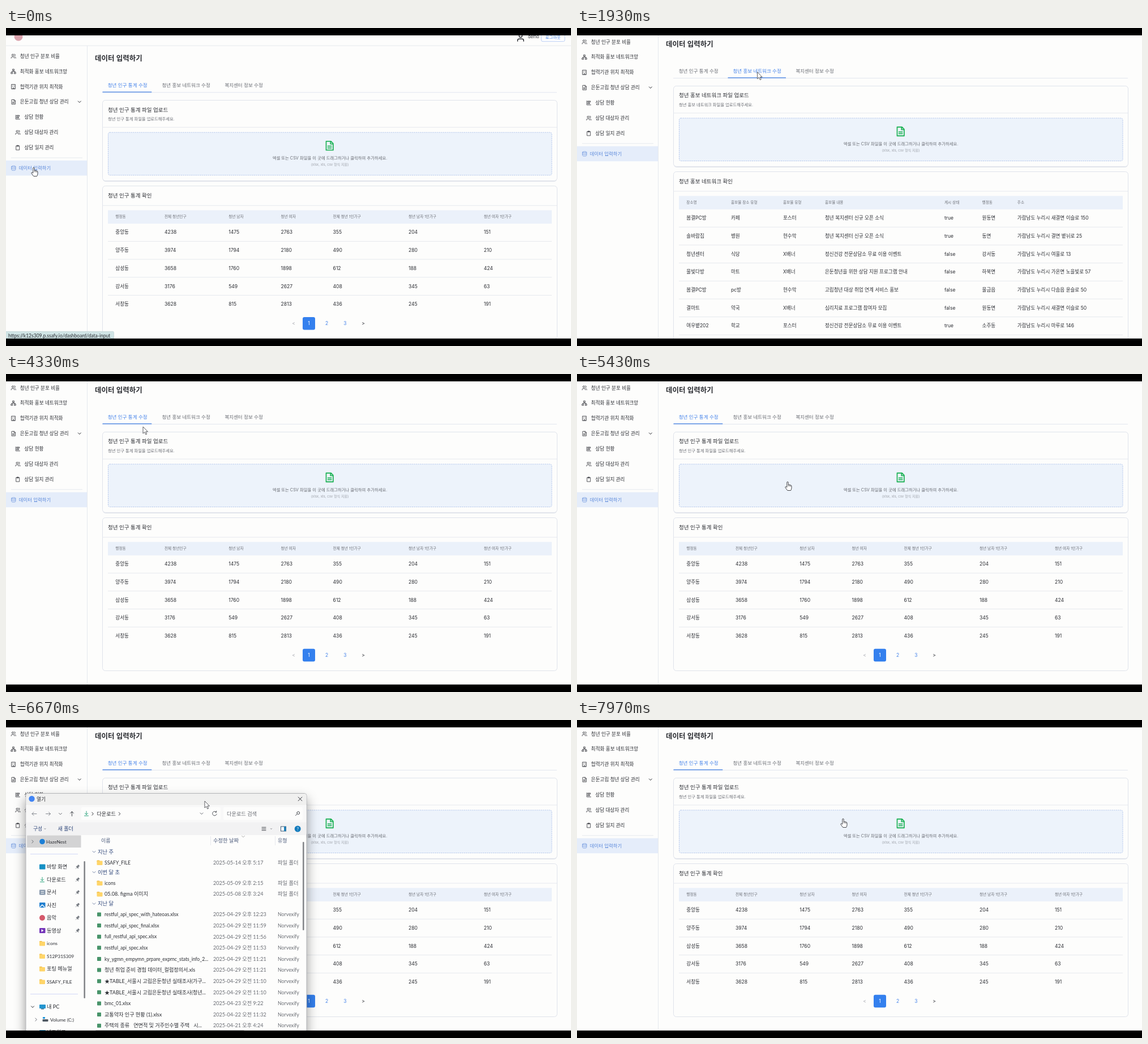
An HTML page for the animation above (8000 ms loop, 998 px wide and 561 px high).

```html
<!DOCTYPE html>
<html lang="ko">
<head>
<meta charset="utf-8">
<style>
  html, body { margin: 0; width: 100%; height: 100%; overflow: hidden; background: #fdfdfc; }
  svg { display: block; width: 998px; height: 561px; }
  text { font-family: Inter, 'Noto Sans CJK KR', 'Noto Sans CJK', sans-serif; white-space: pre; }
  #dialog text { font-family: Lato, 'Noto Sans CJK KR', 'Noto Sans CJK', sans-serif; }
  #status text { font-family: Lato, sans-serif; }
  #frame { filter: drop-shadow(0 10px 10px rgba(0, 0, 0, .4)); }
</style>
</head>
<body>
<svg id="stage" viewBox="0 0 998 561"></svg>
<script>
const LOOP = 8000;
const BLUE = '#4583ea', INK = '#2b2d33', GRAY = '#6a6d74', LINE = '#e6e9ee', PAPER = '#fdfdfc';

// Drawing helpers; text y is the visual middle of the line.
const text = (x, y, s, size = 8.55, fill = INK, extra = '') =>
  `<text x="${x}" y="${y + size * .36}" font-size="${size}" fill="${fill}" ${extra}>${s}</text>`;
const mid = (x, y, s, size, fill, extra = '') => text(x, y, s, size, fill, 'text-anchor="middle" ' + extra);
const rect = (x, y, w, h, fill, extra = '') =>
  `<rect x="${x}" y="${y}" width="${w}" height="${h}" fill="${fill}" ${extra}/>`;
const line = (x1, y1, x2, y2, color = LINE, w = 1) =>
  `<path d="M${x1} ${y1}L${x2} ${y2}" stroke="${color}" stroke-width="${w}"/>`;
const stroke = (x, y, d, color, w = 1) =>
  `<path transform="translate(${x} ${y})" d="${d}" fill="none" stroke="${color}" stroke-width="${w}" stroke-linecap="round" stroke-linejoin="round"/>`;
const dot = (x, y, r, fill) => `<circle cx="${x}" cy="${y}" r="${r}" fill="${fill}"/>`;
const icon = (x, y, size, name, color = INK, w = 2) =>
  `<g transform="translate(${x} ${y}) scale(${size / 24}) translate(-12 -12)">${stroke(0, 0, ICONS[name], color, w)}</g>`;

const ICONS = {
  users: 'M16 21v-2a4 4 0 0 0-4-4H6a4 4 0 0 0-4 4v2M5 7a4 4 0 1 0 8 0a4 4 0 1 0-8 0M22 21v-2a4 4 0 0 0-3-4M16 3a4 4 0 0 1 0 8',
  user: 'M20 21v-2a4 4 0 0 0-4-4H8a4 4 0 0 0-4 4v2M8 7a4 4 0 1 0 8 0a4 4 0 1 0-8 0',
  network: 'M16 16h6v6h-6zM2 16h6v6H2zM9 2h6v6H9zM5 16v-4h14v4M12 12V8',
  building: 'M4 2h16v20H4zM9 22v-4h6v4M8 7h1M15 7h1M8 12h1M15 12h1',
  file: 'M15 2H4v20h16V7zM14 2v6h6M8 13h8M8 17h8',
  chart: 'M3 3v18h18M8 4h11v4H8zM8 12h8v4H8z',
  clipboard: 'M5 4h14v18H5zM9 2h6v4H9z',
  data: 'M3 5a9 3 0 1 0 18 0a9 3 0 1 0-18 0M3 5v14a9 3 0 0 0 18 0V5M3 12a9 3 0 0 0 18 0'
};
const DOWN = 'M-2.5 -1.2L0 1.3L2.5 -1.2', RIGHT = 'M-1.2 -2.5L1.3 0L-1.2 2.5';

function sidebar() {
  const items = [['users', '청년 인구 분포 비율'], ['network', '최적화 홍보 네트워크망'], ['building', '협력기관 위치 최적화'],
    ['file', '은둔고립 청년 상담 관리'], ['chart', '상담 현황'], ['users', '상담 대상자 관리'], ['clipboard', '상담 일지 관리']];
  return line(143.5, 6, 143.5, 600) +
    items.map(([name, label], i) => {
      const inset = i > 3 ? 7.7 : 0, y = 24.5 + i * 26.9;
      return icon(13.2 + inset, y, 9.6, name) + text(24.8 + inset, y, label);
    }).join('') +
    stroke(129.8, 105, DOWN, INK) + line(9, 203.8, 135, 203.8) +
    rect(0, 208.5, 143, 26.7, '#e5edfa') + icon(13.3, 222, 9.6, 'data', '#6a93dd') +
    text(22.8, 222, '데이터 입력하기', 8.4, '#5a88da');
}

function header() {
  return dot(22, -10, 7.5, '#dba3ad') + icon(909, -8, 16, 'user', INK, 2.2) + text(922, -9.5, 'demo', 7.4) +
    rect(945.5, -17, 41.5, 15.5, '#fff', 'rx="2.5" stroke="#b9cdf5"') +
    mid(966.3, -9.3, '로그아웃', 7.3, BLUE) + line(0, 6, 998, 6);
}

function table(xs, heads, rows, pager) {
  const row = (cells, i) => {
    const y = 335.2 + i * 31.7;
    return cells.map((c, k) => text(xs[k], y, c)).join('') +
      (pager && i === rows.length - 1 ? '' : line(180, y + 16, 964, y + 16));
  };
  return rect(180, 296.3, 784, 23.7, '#ebf1fa') +
    heads.map((h, k) => text(xs[k], 307.6, h, 6.65, GRAY)).join('') +
    rows.map(row).join('') +
    (pager ? mid(508, 496, '&lt;', 8.5, '#a5a8ae') + rect(524, 484.8, 22, 22.4, '#3480ee', 'rx="3"') +
      mid(535, 496, '1', 8.5, '#fff') + mid(566.5, 496, '2', 8.5, BLUE) + mid(599, 496, '3', 8.5, BLUE) +
      mid(631, 496, '&gt;', 8.5, INK) : '');
}

const card = (y, h) => rect(170.5, y, 803, h, PAPER, 'rx="5" stroke="#dfe3eb"');

const TABS = [
  { x: 179.8, from: 170.5, to: 257.3, label: '청년 인구 통계 수정', topic: '청년 인구 통계', pager: true,
    xs: [193.3, 280, 393.2, 485.5, 577.6, 711, 844],
    heads: ['행정동', '전체 청년인구', '청년 남자', '청년 여자', '전체 청년 1인가구', '청년 남자 1인가구', '청년 여자 1인가구'],
    rows: ['중앙동 4238 1475 2763 355 204 151', '양주동 3974 1794 2180 490 280 210', '삼성동 3658 1760 1898 612 188 424',
      '강서동 3176 549 2627 408 345 63', '서창동 3628 815 2813 436 245 191'].map(r => r.split(' ')) },
  { x: 275.4, from: 266.5, to: 369, label: '청년 홍보 네트워크 수정', topic: '청년 홍보 네트워크',
    xs: [193.3, 272, 364, 438, 649, 715.6, 777.8],
    heads: ['장소명', '홍보물 장소 유형', '홍보물 유형', '홍보물 내용', '게시 상태', '행정동', '주소'],
    rows: ['봄결PC방|카페|포스터|청년 복지센터 신규 오픈 소식|true|원동면|새결면 이슬로 150',
      '솔바람집|병원|현수막|청년 복지센터 신규 오픈 소식|true|동면|결면 볕뉘로 25',
      '청년센터|식당|X배너|정신건강 전문상담소 무료 이용 이벤트|false|강서동|여울로 13',
      '물빛다방|마트|X배너|은둔청년을 위한 상담 지원 프로그램 안내|false|하북면|가온면 노을빛로 57',
      '봄결PC방|pc방|현수막|고립청년 대상 취업 연계 서비스 홍보|false|물금읍|다솜읍 윤슬로 50',
      '결마트|약국|X배너|심리치료 프로그램 참여자 모집|false|원동면|새결면 이슬로 50',
      '여우볕202|학교|포스터|정신건강 전문상담소 무료 이용 이벤트|true|소주동|마루로 146']
      .map(r => r.split('|')).map(r => [...r.slice(0, 6), '가람남도 누리시 ' + r[6]]) },
  { x: 386.4, from: 377.5, to: 462.5, label: '복지센터 정보 수정', topic: '복지센터 정보', pager: true,
    xs: [193.3, 438, 715.6], heads: ['센터명', '센터 유형', '행정동'],
    rows: ['중앙동', '양주동', '삼성동', '강서동', '서창동'].map(d => ['청년센터', '복지센터', d]) }
];

function tabView(tab, i) {
  return `<g class="tab">` + line(170, 88.5, 973, 88.5, '#e3e7f0') +
    TABS.map(t => text(t.x, 76, t.label, 8.5, t === tab ? BLUE : GRAY)).join('') +
    rect(tab.from, 87, tab.to - tab.from, 1.6, '#6697e6') +
    text(180, 119, tab.topic + ' 파일 업로드', 9.5, INK, 'font-weight="500"') +
    text(180, 135, tab.topic + ' 파일을 업로드해주세요.', 7.3, GRAY) +
    card(253.5, tab.pager ? 270 : 340) + line(170.5, 288, 973, 288) +
    text(180, 270.3, tab.topic + ' 확인', 9.5, INK, 'font-weight="500"') +
    table(tab.xs, tab.heads, tab.rows, tab.pager) + `</g>`;
}

function page() {
  return header() + sidebar() + text(157, 28.6, '데이터 입력하기', 12.5, '#2a2c31', 'font-weight="600"') +
    rect(171, 105, 802, 141, '#e3e6ec', 'rx="5"') + card(102.3, 142) + line(170.5, 150, 973, 150) +
    rect(180.5, 159, 783.5, 75.5, '#edf3fb', 'rx="3" stroke="#afc3ea" stroke-dasharray="2 1.4"') +
    icon(571.7, 182.5, 18.6, 'file', '#25b45c', 2.3) +
    mid(572, 204, '엑셀 또는 CSV 파일을 이 곳에 드래그하거나 클릭하여 추가하세요.', 7.35, GRAY) +
    mid(572, 216, '(xlsx, xls, csv 형식 지원)', 6.1, '#9da1a9') + TABS.map(tabView).join('');
}

const folder = (x, y) => rect(x - 5, y - 4, 5, 3, '#eab540', 'rx="1"') + rect(x - 5, y - 3, 10, 7.4, '#ffd569', 'rx="1"');

function places() {
  const pinned = [['바탕 화면', '#1690c4'], ['다운로드', ''], ['문서', '#8798ac'], ['사진', '#2380cf'], ['음악', '#d5596b'], ['동영상', '#7434b8']];
  const folders = ['icons', 'S12P31S309', '포팅 메뉴얼', 'SSAFY_FILE'];
  const screen = y => rect(59, y - 4, 11, 7, '#2495cf', 'rx="1"') + rect(62, y + 3, 5, 1.5, '#55798f');
  const get = (x, y) => stroke(x, y, 'M0 -4V2M-2.5 -.5L0 2L2.5 -.5M-3.5 4.2H3.5', '#26a27b');
  const name = (x, y, s) => text(x, y, s, /[가-힣]/.exec(s) ? 9.2 : 8.4);
  return rect(37, 203.5, 95.5, 21.5, '#d3d3d4') + stroke(47, 214.5, RIGHT, GRAY) + dot(64, 214.5, 4.8, '#1c7fd6') +
    name(71, 214.7, 'HazeNest') + line(43, 236.5, 127, 236.5, '#d2d8f8') +
    pinned.map(([label, color], i) => {
      const y = 259 + i * 22.5;
      return (color ? (i === 4 ? dot(64, y, 5, color) : rect(59, y - 4.5, 10.5, 9, color, 'rx="1"')) : get(64, y)) +
        (i === 2 ? line(61.5, y - 1.5, 67, y - 1.5, '#fff') + line(61.5, y + 1.5, 67, y + 1.5, '#fff') : '') +
        (i === 3 ? stroke(64, y, 'M-4 3.5L0 -.5L4 3.5', '#fff', 1.4) : '') +
        (i === 5 ? `<path d="M62.5 ${y - 2.5}l4 2.5l-4 2.5z" fill="#fff"/>` : '') +
        name(72, y, label) +
        `<path transform="translate(126.5 ${y})" d="M-3.5 3.5L-1 1M-2.5 -.5L1 3L1 .5L3.3 -1.5L1.2 -3.5L-.5 -1.2z" fill="#777b82" stroke="#777b82" stroke-width=".8"/>`;
    }).join('') +
    folders.map((s, i) => folder(64, 394 + i * 22.5) + name(72, 394 + i * 22.5, s)).join('') +
    line(43, 483.5, 127, 483.5, '#d2d8f8') + stroke(47, 506, DOWN, INK) + screen(506) + name(72, 506, '내 PC') +
    stroke(53, 528.5, RIGHT, GRAY) + rect(64.5, 528, 10, 4, '#505962', 'rx="1"') + rect(65, 524, 4, 3, '#2398dc') +
    name(78, 529, 'Volume (C:)') + stroke(47, 551, RIGHT, GRAY) + screen(551) + name(72, 551, '네트워크') +
    rect(137.4, 249, 2.6, 242, '#85878b', 'rx="1.3"');
}

function files() {
  const group = (y, s) => stroke(155.5, y, DOWN, '#536793', .8) + text(162, y, s, 9.3, '#2c4478');
  const row = (y, s, date, isFolder) => (isFolder ? folder(165.5, y) : rect(161, y - 3.5, 7, 7, '#48946a', 'rx=".8"')) +
    text(174, y, s, /[가-힣]/.exec(s) ? 9.1 : 8.6) + text(366, y, '2025-' + date, 9.1, GRAY) +
    text(480, y, isFolder ? '파일 폴더' : 'Norvexify E', isFolder ? 9.3 : 8.8, GRAY);
  const sheets = [['restful_api_spec_with_hateoas.xlsx', '04-29 오후 12:23'], ['restful_api_spec_final.xlsx', '04-29 오전 11:59'],
    ['full_restful_api_spec.xlsx', '04-29 오전 11:56'], ['restful_api_spec.xlsx', '04-29 오전 11:53'],
    ['ky_ygmn_empymn_prpare_exprnc_stats_info_2...', '04-29 오전 11:21'], ['청년 취업 준비 경험 데이터_컬럼정의서.xls', '04-29 오전 11:21'],
    ['★TABLE_서울시 고립은둔청년 실태조사(가구...', '04-29 오전 11:10'], ['★TABLE_서울시 고립은둔청년 실태조사(청년...', '04-29 오전 11:10'],
    ['bmc_01.xlsx', '04-23 오전 9:22'], ['교통약자 인구 현황 (1).xlsx', '04-22 오전 11:32'],
    ['주택의 종류   연면적 및 거주인수별 주택   시...', '04-21 오후 4:24']];
  return text(168, 212.3, '이름', 9, '#4d5c7c') + text(366, 212.3, '수정한 날짜', 9.3, '#4d5c7c') + text(480, 212.3, '유형', 9, '#4d5c7c') +
    line(361.5, 205, 361.5, 221) + line(475.5, 205, 475.5, 221) + stroke(419, 205.5, DOWN, '#888', .7) +
    group(232.5, '지난 주') + row(251.5, 'SSAFY_FILE', '05-14 오후 5:17', true) +
    group(268.5, '이번 달 초') + row(287.5, 'icons', '05-09 오후 2:15', true) + row(307, '05.08. figma 이미지', '05-08 오후 3:24', true) +
    group(324, '지난 달') + sheets.map(([s, d], i) => row(343 + i * 19.62, s, d)).join('');
}

function dialog() {
  return rect(35, 129.5, 496, 491.5, PAPER, 'id="frame" rx="4" stroke="#b4b5b8"') +
    rect(35.5, 130, 495, 20.5, '#f0f0ef', 'rx="4"') + dot(45.5, 139, 5.2, '#4285f4') + text(54, 139.5, '열기', 8.8) +
    stroke(519.5, 139.3, 'M-3.3 -3.3L3.3 3.3M3.3 -3.3L-3.3 3.3', INK) +
    rect(35.5, 150, 495, 30.5, '#f8f8f8') + rect(133, 154, 246, 22, PAPER, 'rx="2"') + rect(384, 154, 140, 22, PAPER, 'rx="2"') +
    stroke(50, 165.5, 'M4 0H-4M-1 -3L-4 0L-1 3', '#858990') + stroke(74.5, 165.5, 'M-4 0H4M1 -3L4 0L1 3', '#858990') +
    stroke(96, 165.5, DOWN, GRAY) + stroke(116.5, 165.5, 'M0 4V-4M-3 -1L0 -4L3 -1', '#44474d') +
    stroke(142, 165, 'M0 -4V2M-2.5 -.5L0 2L2.5 -.5M-3.5 4H3.5', '#26a27b') + stroke(153, 165.5, RIGHT, INK) +
    text(160.5, 165.3, '다운로드', 9.1) + stroke(200.5, 165.5, RIGHT, INK) + stroke(345.5, 165, DOWN, GRAY) +
    stroke(368.5, 165, 'M3 -2.4A3.8 3.8 0 1 0 3.7 1M3.2 -4.5V-2.2H1', '#55585e') + text(390, 165.3, '다운로드 검색', 9.2, GRAY) +
    stroke(515, 165, 'M-.8 .8L-3.5 3.5M-1.2 -1a2.4 2.4 0 1 0 4.8 0a2.4 2.4 0 1 0-4.8 0', '#44474d') +
    rect(35.5, 180.5, 495, 22.5, '#f2f2f3') + text(48, 192, '구성', 8.8, '#2c4478') + stroke(69, 192, 'M-1 -.4L0 .6L1 -.4', GRAY) +
    text(91.5, 192, '새 폴더', 9.1, '#2c4478') + stroke(455.5, 192, 'M-3.5 -2.7H3.5M-3.5 0H3.5M-3.5 2.7H3.5', '#44474d') +
    stroke(468.5, 192, 'M-1 -.4L0 .6L1 -.4', GRAY) + rect(485.5, 188, 9, 8, '#fff', 'stroke="#3b5873"') + rect(491, 188, 3.5, 8, '#2183bd') +
    dot(515.2, 192, 5.5, '#147cbd') + mid(515.2, 192, '?', 8, '#fff') +
    `<clipPath id="list"><rect x="35" y="203" width="485" height="352"/></clipPath><g clip-path="url(#list)">${places()}${files()}</g>` +
    rect(524, 215, 2.6, 156, '#85878b', 'rx="1.3"') + rect(158, 547.5, 263, 2.6, '#85878b', 'rx="1.3"') +
    rect(35.5, 555, 495, 65.5, '#f0f0f0', 'rx="3"') + text(126, 580.5, '파일 이름(N):', 9) +
    rect(179.5, 573.3, 198, 14, '#fff', 'stroke="#75add0"') + stroke(371.5, 580.5, DOWN, GRAY, .8) +
    rect(386.5, 573.3, 131.5, 14, PAPER, 'stroke="#e4e4e8"') + text(388, 580.5, '사용자 지정 파일 (*.xlsx;*.xls;*.c', 8.9) +
    rect(506, 574, 11.5, 12.5, PAPER) + stroke(512, 580.5, DOWN, GRAY, .8) +
    rect(386.5, 591.3, 61, 18, PAPER, 'rx="1" stroke="#7eaed2"') + mid(417, 600.3, '열기(O)', 9) +
    rect(457, 591.3, 61, 18, PAPER, 'rx="1" stroke="#dddde0"') + mid(487, 600.3, '취소', 9) +
    stroke(525, 615, 'M-3 3L3 -3M0 3L3 0', '#aaa', .8);
}

const ARROW = '<path d="M0 0V12L2.8 9.4L4.8 13.8L6.7 13L4.8 8.8H8.5z" fill="#fff" stroke="#4a4b50" stroke-width=".9" stroke-linejoin="round"/>';
const HAND = '<path d="M-1.2 .8Q0 -.8 1.2 .8V5.2L5.4 6Q7 6.4 7 8V11Q7 13 5.6 15.5H-.2L-4 10.5Q-4.4 8.4 -2.8 8.8L-1.2 10z" fill="#fff" stroke="#3e3f44" stroke-width=".95" stroke-linejoin="round"/><path d="M1.2 5V8.2M3.2 6V8.5M5.2 6.2V8.8" stroke="#3e3f44" stroke-width=".7"/>';

const stage = document.getElementById('stage');
stage.innerHTML = rect(0, 0, 998, 561, PAPER) + `<g id="page">${page()}</g>` +
  `<g id="status">${rect(-1, 535.3, 191.5, 14, '#d0e4e5', 'rx="2" stroke="#bdcfd1" stroke-width=".6"')}${text(4, 542.8, 'https://k12s309.p.ssafy.io/dashboard/data-input', 8.5)}</g>` +
  `<g id="dialog">${dialog()}</g><g id="cursor"><g id="arrow">${ARROW}</g><g id="hand">${HAND}</g></g>` +
  rect(0, 0, 998, 13, '#000') + rect(0, 547.8, 998, 14, '#000');

const el = id => document.getElementById(id);
const tabs = [...document.querySelectorAll('.tab')];
const show = (node, on) => node.setAttribute('display', on ? 'inline' : 'none');
const move = (node, x, y) => node.setAttribute('transform', `translate(${x} ${y})`);

// Each step: time, x, y.
const POINTER = [[0, 49, 246], [300, 49, 246], [900, 389, 223], [1150, 389, 223], [1700, 318, 78], [2350, 320, 77],
  [2730, 401, 70], [3200, 412, 74], [3650, 225, 76], [4000, 225, 76], [4330, 242, 93], [4900, 372, 190],
  [5550, 372, 190], [6050, 321, -33.5], [6260, 321, -33.5], [6670, 351, 143], [6900, 351, 143],
  [7400, 518, 137], [7680, 518, 137], [7930, 470, 174], [LOOP, 470, 174]];
const WINDOW = [[0, -30, -176.5], [6260, -30, -176.5], [6670, 0, 0], [LOOP, 0, 0]];
const SCROLL = [[0, 0, 25.2], [760, 0, 25.2], [920, 0, 0], [LOOP, 0, 0]];
const TAB_AT = [[0, 0], [1800, 1], [2950, 2], [3720, 0]];

function at(steps, t) {
  const i = steps.findIndex(s => s[0] > t), [t0, x0, y0] = steps[i - 1], [t1, x1, y1] = steps[i];
  const p = (t - t0) / (t1 - t0), e = p * p * (3 - 2 * p);
  return [x0 + (x1 - x0) * e, y0 + (y1 - y0) * e];
}

function draw(now) {
  const t = now % LOOP, [x, y] = at(POINTER, t), scroll = at(SCROLL, t)[1];
  const open = t >= 5480 && t < 7640;
  const current = TAB_AT.filter(s => s[0] <= t).pop()[1];
  const onDrop = x > 180 && x < 964 && y > 159 + scroll && y < 234 + scroll;
  const pointing = !open && (x < 143 || onDrop);
  move(el('page'), 0, scroll);
  move(el('dialog'), ...at(WINDOW, t));
  move(el('cursor'), x, y);
  tabs.forEach((node, i) => show(node, i === current));
  show(el('status'), t < 620);
  show(el('dialog'), open);
  show(el('hand'), pointing);
  show(el('arrow'), !pointing);
}

const start = performance.now();
function tick() {
  draw(performance.now() - start);
  requestAnimationFrame(tick);
}
tick();
</script>
</body>
</html>
```
